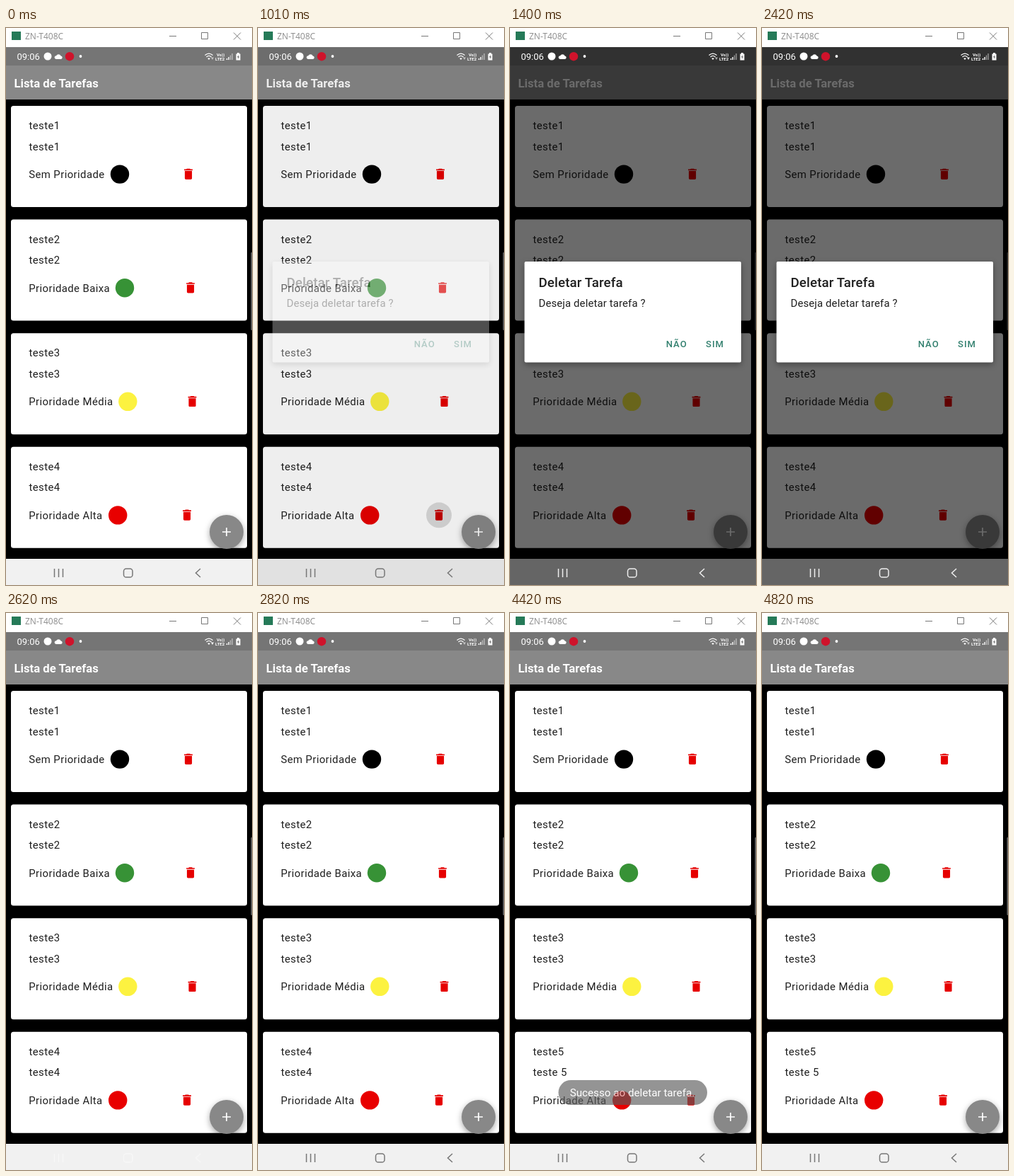
Animation, 348 px wide and 787 px high, one loop 5.82 s. Source, as an HTML page:

```html
<!DOCTYPE html>
<html lang="pt">
<head>
<meta charset="utf-8">
<title>Lista de Tarefas</title>
<style>
html, body { margin: 0; width: 100%; height: 100%; overflow: hidden; background: #000; }
svg { display: block; width: 348px; height: 787px; font-family: Roboto, sans-serif; }
.body { font-size: 14.9px; letter-spacing: .42px; fill: #1f1f1f; }
.button { font-size: 13px; font-weight: 500; letter-spacing: 1.05px; fill: #33806f; }
.shadow { filter: drop-shadow(0 3px 4px rgba(0, 0, 0, .35)); }
</style>
</head>
<body>
<svg viewBox="0 0 348 787">
  <defs>
    <path id="bin" d="M6 19c0 1.1.9 2 2 2h8c1.1 0 2-.9 2-2V7H6zM19 4h-3.5l-1-1h-5l-1 1H5v2h14z"
      transform="scale(.8455) translate(-12 -12)" fill="#e60000"/>
  </defs>

  <!-- window title -->
  <rect width="348" height="27" fill="#fff"/>
  <rect x="8" y="5" width="13" height="12" fill="#257a58"/>
  <text x="27" y="16" font-family="Open Sans, sans-serif" font-size="12" fill="#8c8c8c">ZN-T408C</text>
  <path d="M231 11.5h10M276.5 6.5h9v9h-9zM322 6.5l10 10m0-10l-10 10" fill="none" stroke="#777"/>

  <!-- app -->
  <rect y="27" width="348" height="26" fill="#757575"/>
  <rect y="53" width="348" height="48" fill="#888"/>
  <text x="11.5" y="84" font-size="16.7" font-weight="700" fill="#fff">Lista de Tarefas</text>
  <g id="cards"></g>
  <circle id="ripple" cx="256" cy="688.3" r="18"/>
  <g class="shadow"><circle cx="312" cy="712" r="24" fill="#888"/></g>
  <path d="M306 712h12M312 706v12" stroke="#fff" stroke-width="1.7"/>
  <rect x="346.5" y="317" width="2" height="110" rx="1" fill="#666"/>
  <rect y="750" width="348" height="37" fill="#f1f1f1"/>
  <rect id="scrim" y="27" width="348" height="760"/>

  <!-- status bar -->
  <g fill="#fff">
    <text x="15.5" y="45" font-size="13">09:06</text>
    <circle cx="59" cy="40" r="5.5"/>
    <path d="M71 44a2.4 2.4 0 0 1 0-4.8a3.7 3.7 0 0 1 6.6.3a2.3 2.3 0 0 1 .4 4.5z"/>
    <circle cx="90" cy="40.2" r="6.2" fill="#cf132b"/>
    <circle cx="105.5" cy="40" r="1.9"/>
    <path d="M281.5 38.6q5.5-5 11 0M283.5 41q3.5-3.2 7 0" fill="none" stroke="#fff" stroke-width="1.3"/>
    <path d="M285.2 43q1.8-1.5 3.6 0l-1.8 2z"/>
    <path id="arrow" d="M290 41.5h4l-2 3.5z"/>
    <text x="298" y="39.5" font-size="6" font-weight="700">Vo))</text>
    <text x="296" y="45.5" font-size="6" font-weight="700">LTE2</text>
    <path d="M312.5 45v-2M315 45v-4" stroke="#fff" stroke-width="1.4"/>
    <path d="M317.5 45v-6.5M320 45v-9" stroke="#fff" stroke-width="1.4" opacity=".5"/>
    <path d="M325.5 36.5h1.5V35h3v1.5h1.5v9h-6z"/>
    <path d="M329.3 37.7l-2.3 3.6h1.5l-.8 3 2.4-3.8h-1.5z" fill="#555"/>
  </g>

  <g id="nav" fill="none" stroke-width="1.5">
    <path d="M68.5 764v12M74.5 764v12M80.5 764v12M275 764l-6.5 6 6.5 6"/>
    <rect x="166.5" y="764" width="12.5" height="12" rx="3.6"/>
  </g>

  <g id="dialog">
    <rect class="shadow" x="20.5" y="330" width="306.5" height="142.5" rx="2" fill="#fff"/>
    <text x="40.5" y="365.7" font-size="18.7" font-weight="500" letter-spacing=".15" fill="#1f1f1f">Deletar Tarefa</text>
    <text class="body" x="40.5" y="394.3" style="letter-spacing:.14px">Deseja deletar tarefa ?</text>
    <text class="button" x="220.7" y="451.2">NÃO</text>
    <text class="button" x="277" y="451.2">SIM</text>
  </g>

  <g id="toast">
    <rect x="68.5" y="660" width="210.5" height="35" rx="17.5" fill="#5c5c5c" opacity=".93"/>
    <text x="84.7" y="682.8" font-size="15.2" fill="#fff">Sucesso ao deletar tarefa.</text>
  </g>
</svg>
<script>
const $ = id => document.getElementById(id);

// label, dot colour, dot x, bin x
const tasks = [
  ['Sem Prioridade', '#000', 161, 258],
  ['Prioridade Baixa', '#379236', 168, 261],
  ['Prioridade Média', '#fcf240', 172.3, 263.5],
  ['Prioridade Alta', '#e80000', 158.2, 256]
];
$('cards').innerHTML = tasks.map(([label, color, dot, bin], i) => `
  <g transform="translate(0 ${i * 160.6})" class="body">
    <rect x="7" y="110" width="334" height="143" rx="3.5" fill="#fff"/>
    <text x="32.5" y="143.3">teste${i + 1}</text>
    <text x="32.5" y="172.6">teste${i + 1}</text>
    <text x="32.2" y="212.2">${label}</text>
    <circle cx="${dot}" cy="206.6" r="13.2" fill="${color}"/>
    <use href="#bin" x="${bin}" y="206.3"/>
  </g>`).join('');
const [name, note] = $('cards').lastElementChild.querySelectorAll('text');

const LOOP = 5820, GREY = '#777', PALE = '#f7f7f7';
const base = { scrim: 0, dialog: 0, ripple: 0, toast: 0, arrow: .6, nav: GREY, next: false };
const open = { scrim: .58, dialog: 1, nav: '#eee' };
const steps = [
  [0, {}],
  [1010, { scrim: .065, dialog: .31, ripple: .14 }],
  [1210, { ...open, ripple: .05 }],
  [1400, open],
  [2420, { ...open, arrow: 1 }],
  [2620, { nav: PALE, arrow: 1 }],
  [2820, {}],
  [3020, { next: true, toast: .5 }],
  [3220, { next: true, toast: 1 }],
  [4420, { next: true, toast: .7 }],
  [4620, { next: true, toast: .25 }],
  [4820, { next: true }]
];

let start;
function draw(now) {
  start ??= now;
  const t = (now - start) % LOOP;
  const state = { ...base, ...steps.findLast(([at]) => t >= at)[1] };
  for (const id of ['scrim', 'dialog', 'ripple', 'toast', 'arrow'])
    $(id).setAttribute('opacity', state[id]);
  $('nav').setAttribute('stroke', state.nav);
  name.textContent = state.next ? 'teste5' : 'teste4';
  note.textContent = state.next ? 'teste 5' : 'teste4';
  requestAnimationFrame(draw);
}
draw(performance.now());
</script>
</body>
</html>
```
